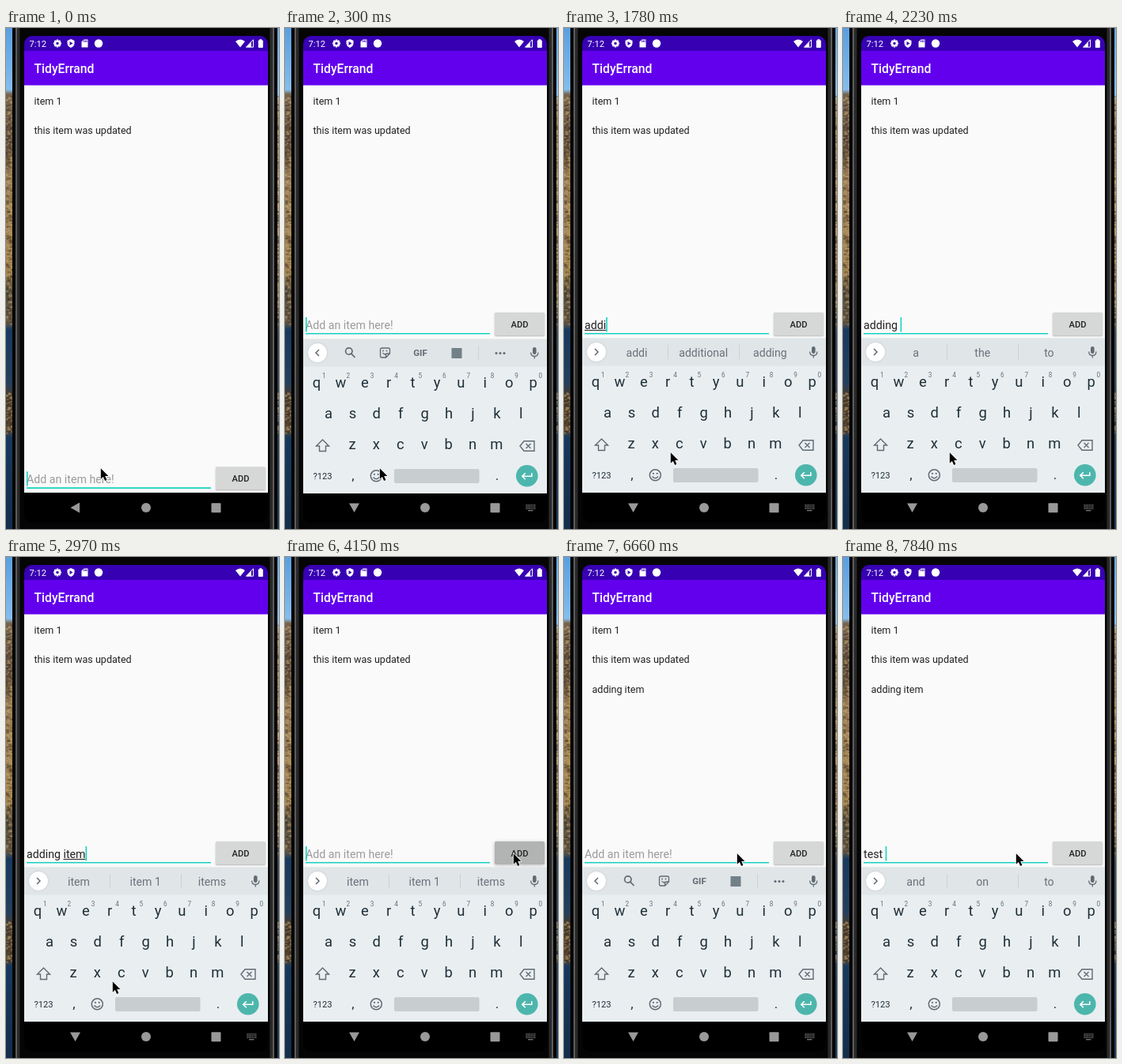
Animation, 345 px wide and 634 px high, one loop 8 s. Source, as an HTML page with a canvas:

```html
<!DOCTYPE html>
<html lang="en">
<head>
<meta charset="utf-8">
<title>To-do list</title>
<style>
html, body { margin: 0; width: 100%; height: 100%; overflow: hidden; background: #000; }
canvas { display: block; width: 345px; height: 634px; }
</style>
</head>
<body>
<canvas id="stage"></canvas>
<script>
const W = 345, H = 634, LOOP = 8000, TICK = LOOP / 54;
const canvas = document.getElementById('stage');
const dpr = window.devicePixelRatio || 1;
canvas.width = W * dpr;
canvas.height = H * dpr;
const c = canvas.getContext('2d');

const INK = '#1f3038', ICON = '#5f6b72', TEAL = '#14d3c1', KEYS = '#e9eef1';
const HINT = 'Add an item here!';
const TOOLBAR_BACK = 4440;

// time, typed text, suggestions (none: toolbar icons)
const typing = [
  [0, ''],
  [150, ''],
  [1040, 'a', 'a and at'],
  [1190, 'ad', 'ad add ads'],
  [1490, 'add', 'add added adding'],
  [1780, 'addi', 'addi additional adding'],
  [1930, 'addin', 'addin adding addings'],
  [2080, 'adding', 'adding adding. additional'],
  [2230, 'adding ', 'a the to'],
  [2380, 'adding i', 'I in it'],
  [2680, 'adding it', 'it its item'],
  [2820, 'adding ite', 'ite item items'],
  [2970, 'adding item', 'item item_1 items'],
  [4150, '', 'item item_1 items'],
  [7100, 't', 't the to'],
  [7400, 'te', 'te tell text'],
  [7550, 'tes', 'tes test tests'],
  [7700, 'test', 'test tests testing'],
  [7840, 'test ', 'and on to']
];

// time, x, y of the pointer tip
const pointer = [
  [0, 119, 557], [440, 124, 551], [590, 131, 541], [740, 134, 537],
  [3410, 153, 521], [3560, 207, 465], [3700, 266, 396], [3850, 288, 375],
  [4580, 283, 376], [4730, 261, 378], [4880, 236, 376], [5020, 223, 375], [5170, 218, 375]
];
const slide = [[0, 196], [150, 70], [300, 1], [440, 0]];
const toastAlpha = [[0, 0], [4440, 0.45], [4580, 1], [6360, 0.7], [6510, 0.25], [6660, 0]];

const at = (list, t) => list.findLast(k => k[0] <= t);

function rect(x, y, w, h, fill, r = 0) {
  c.fillStyle = fill;
  c.beginPath();
  c.roundRect(x, y, w, h, r);
  c.fill();
}

function disc(x, y, r, fill) {
  c.fillStyle = fill;
  c.beginPath();
  c.arc(x, y, r, 0, Math.PI * 2);
  c.fill();
}

function text(s, x, y, size, fill, align = 'left', weight = 400) {
  c.font = `${weight} ${size}px Roboto, sans-serif`;
  c.textAlign = align;
  c.fillStyle = fill;
  c.fillText(s, x, y);
}

// SVG path placed at x, y
function shape(d, x, y, fill, line, width = 1.5) {
  const p = new Path2D(d);
  c.save();
  c.translate(x, y);
  if (fill) { c.fillStyle = fill; c.fill(p); }
  if (line) { c.strokeStyle = line; c.lineWidth = width; c.stroke(p); }
  c.restore();
}

function fade(x, w, stops) {
  const g = c.createLinearGradient(0, 0, 0, H);
  stops.forEach(([y, color]) => g.addColorStop(y / H, color));
  rect(x, 0, w, H, g);
}

// rocky speckle between two heights
function grain(x, w, top, bottom) {
  let seed = 7;
  const rnd = () => (seed = seed * 16807 % 2147483647) / 2147483647;
  for (let y = top; y < bottom; y += 1.2) {
    const tone = rnd() < 0.55 ? '40,30,20' : '215,180,125';
    rect(x + rnd() * w - 2, y, 2 + rnd() * 3, 1 + rnd() * 2, `rgba(${tone},.35)`);
  }
}

function drawPhone() {
  fade(0, 9, [[0, '#5a9fe0'], [78, '#86bdec'], [84, '#75634c'], [150, '#5a4937'], [185, '#93774f'],
    [310, '#a2834f'], [335, '#4f4838'], [372, '#6a5b45'], [382, '#173a60'], [450, '#24405c'],
    [465, '#493c2c'], [510, '#574732'], [518, '#17395e'], [634, '#132d4c']]);
  fade(342, 3, [[0, '#6aa9e4'], [84, '#8cbfea'], [94, '#8c7a5f'], [330, '#a48b60'],
    [385, '#3d4c58'], [634, '#1b3a5c']]);
  for (const [x, w] of [[0, 9], [342, 3]]) {
    grain(x, w, 86, 376);
    grain(x, w, 460, 512);
  }
  rect(8, 0, 335, H, '#050505');
  for (const [x, w, color] of [[12, 2, '#5c5c5c'], [14, 3.5, '#2a2a2a']]) {
    rect(x, 0, w, H, color);
    rect(351 - x - w, 0, w, H, color);
  }
}

function drawBars() {
  rect(23, 10, 308, 20, '#3700b3', [10, 10, 0, 0]);
  rect(23, 29, 308, 43.4, '#6200ee');
  text('TidyErrand', 35.5, 57, 15.7, '#fff', 'left', 500);
  text('7:12', 29.5, 24, 11.2, '#fff');
  for (let i = 0; i < 4; i++) {
    c.save();
    c.translate(65, 19.5);
    c.rotate(i * Math.PI / 4);
    rect(-1.3, -5, 2.6, 10, '#fff', 0.5);
    c.restore();
  }
  disc(65, 19.5, 3.8, '#fff');
  disc(65, 19.5, 1.7, '#3700b3');
  shape('M0-5.5L4.5-3.5V0Q4 4 0 5.5Q-4 4-4.5 0V-3.5Z', 82, 19.5, '#fff');
  shape('M-1.5-2.5L2.5 0L-1.5 2.5Z', 82, 19.5, '#3700b3');
  shape('M-1-5H4V5H-4V-2Z', 99.5, 19.5, '#fff');
  for (let i = 0; i < 3; i++) rect(98.2 + i * 1.7, 15.5, 0.9, 2.4, '#3700b3');
  disc(117, 19.5, 5.2, '#fff');
  shape('M0 5L-6-2.5Q0-7.5 6-2.5Z', 296, 19.5, '#fff');
  shape('M-4.5 4.7H4.5V-4.7Z', 308, 19.5, null, '#fff', 1);
  shape('M-4.5 4.7H2V-2Z', 308, 19.5, '#fff');
  rect(318.8, 15.5, 6, 9.5, '#fff', 0.8);
  rect(320.4, 14.2, 2.8, 2, '#fff');
}

function drawInput(t, typed, since, dy, pressed) {
  const x = 26, base = 380.5 + dy;
  text(typed || HINT, x, base, 14.2, typed ? '#212121' : '#9b9b9b');
  const word = typed.lastIndexOf(' ') + 1;
  if (word < typed.length) {
    const from = c.measureText(typed.slice(0, word)).width;
    rect(x + from, base + 1.5, c.measureText(typed.slice(word)).width, 1, '#212121');
  }
  rect(x, 386 + dy, 233, 1.6, TEAL);
  const tick = Math.floor((t + 12) / TICK) * TICK;
  if ((tick - since + 30) % 1000 < 500) {
    const w = typed ? c.measureText(typed).width : 0;
    rect(x + w, 366 + dy, 1.6, 18.5, TEAL);
  }
  c.save();
  c.shadowColor = 'rgba(0,0,0,.28)';
  c.shadowBlur = pressed ? 4 : 2;
  c.shadowOffsetY = 1;
  rect(265, 360 + dy, 63, 29, pressed ? '#b2b3b3' : '#d6d7d7', 1.6);
  c.restore();
  text('ADD', 296.5, 378.7 + dy, 11.2, '#222', 'center', 500);
}

function drawStrip(words) {
  rect(23, 392.5, 308, 35, '#e0e5e8');
  c.save();
  c.shadowColor = 'rgba(0,0,0,.2)';
  c.shadowBlur = 2;
  disc(41, 410, 12, '#fff');
  c.restore();
  shape(words ? 'M-2-4L2 0L-2 4' : 'M2-4L-2 0L2 4', 41, 410, null, ICON);
  if (words) {
    words.split(' ').forEach((w, i) =>
      text(w.replace('_', ' '), 92 + i * 84.2, 415.5, 14.1, '#68737a', 'center'));
    rect(131, 401, 1, 18, '#ccd2d5');
    rect(221, 401, 1, 18, '#ccd2d5');
  } else {
    shape('M3-2A4.2 4.2 0 1 1-5.4-2A4.2 4.2 0 1 1 3-2M2 1.4L6.5 6', 82, 410, null, ICON, 1.7);
    shape('M-4-6H4Q6-6 6-4V1L1 6H-4Q-6 6-6 4V-4Q-6-6-4-6M6 1H3Q1 1 1 3V6M-3 0Q-1 3 1 1', 126.5, 410, null, ICON, 1.3);
    disc(124, 407.5, 0.9, ICON);
    disc(128.5, 407.5, 0.9, ICON);
    text('GIF', 171, 414.2, 11.5, ICON, 'center', 700);
    rect(210.5, 404, 13, 13, '#728087');
    rect(244, 401, 1, 18, '#ccd2d5');
    for (let i = -1; i < 2; i++) disc(272 + i * 5, 410.5, 1.5, ICON);
  }
  rect(313, 403, 4.6, 9, ICON, 2.3);
  shape('M-4.6-1Q-4.6 4 0 4Q4.6 4 4.6-1M0 4V7', 315.3, 410.5, null, ICON, 1.3);
}

function drawKeys() {
  const rows = ['qwertyuiop', 'asdfghjkl', 'zxcvbnm'];
  rows.forEach((row, r) => {
    const x0 = [40, 55, 85][r];
    [...row].forEach((k, i) => {
      const x = x0 + i * 30.4;
      text(k, x, 453.7 + r * 39.2, 18.4, INK, 'center');
      if (!r) text((i + 1) % 10, x + 9.3, 441.8, 8.2, '#66727a', 'center');
    });
  });
  shape('M0-7.5L8 .5H4V7H-4V.5H-8Z', 47.5, 527.5, null, ICON, 1.4);
  shape('M-9 0L-4-6.3H9V6.3H-4ZM-1.5-3L4.5 3M4.5-3L-1.5 3', 306, 528, null, ICON, 1.4);
  text('?123', 47.5, 570, 11.2, INK, 'center');
  text(',', 86, 570.5, 17, INK, 'center');
  text('.', 268, 570.5, 17, INK, 'center');
  shape('M7 0A7 7 0 1 1-7 0A7 7 0 1 1 7 0M-3.8 1.8Q0 6.2 3.8 1.8', 115.3, 565.8, null, ICON, 1.5);
  disc(112.9, 563.8, 1.1, ICON);
  disc(117.7, 563.8, 1.1, ICON);
  rect(138, 557, 107.5, 18, '#c8cdd0', 2);
  disc(305.8, 565.8, 13.8, '#4db6ac');
  shape('M6-4V0H-6M-2-4L-6 0L-2 4', 305.8, 566.3, null, '#fff', 1.6);
}

function drawToast(alpha) {
  if (!alpha) return;
  c.save();
  c.globalAlpha = alpha;
  c.shadowColor = 'rgba(0,0,0,.12)';
  c.shadowBlur = 3;
  rect(119, 533.5, 116, 35.5, '#ebeff1', 17.7);
  c.shadowColor = 'transparent';
  text('Item was added', 176.8, 555, 11.1, '#202020', 'center');
  c.restore();
}

function drawNav(open) {
  const gray = '#999';
  rect(23, 588, 308, 38, '#000', [0, 0, 10, 10]);
  shape(open ? 'M-6.5-5.5H6.5L0 6Z' : 'M5.5-6.5V6.5L-6 0Z', 87.5, 607, gray);
  disc(177, 607, 6, gray);
  rect(259.5, 601.3, 12, 12, gray, 1);
  if (!open) return;
  for (let r = 0; r < 3; r++)
    for (let i = 0; i < 6; i++) rect(304.5 + i * 2.1, 603 + r * 2.3, 1.3, 1.4, '#777');
  rect(307, 610, 6.5, 1.3, '#777');
}

function drawPointer(x, y) {
  c.lineJoin = 'round';
  const d = 'M0 0V13.4L3.1 10.6L5.3 15.6L7.6 14.6L5.4 9.7H9.6Z';
  shape(d, x + 0.8, y + 0.3, '#000', '#fff', 1.6);
  shape(d, x + 0.8, y + 0.3, '#000');
  c.lineJoin = 'miter';
}

function drawKeyboard(dy, words) {
  c.save();
  c.beginPath();
  c.rect(23, 392, 308, 197);
  c.clip();
  c.translate(0, dy);
  rect(23, 392.5, 308, 195.5, KEYS);
  drawStrip(words);
  drawKeys();
  c.restore();
}

function draw(t) {
  const [since, typed, words] = at(typing, t);
  const open = t >= 150;
  c.setTransform(dpr, 0, 0, dpr, 0, 0);
  c.clearRect(0, 0, W, H);
  drawPhone();
  rect(23, 72, 308, 516, '#fafafa');
  drawBars();
  const items = ['item 1', 'this item was updated'];
  if (t >= 4290) items.push('adding item');
  items.forEach((s, i) => text(s, 35.5, 96.5 + i * 37.7, 12.55, '#222'));
  drawInput(t, typed, since, open ? 0 : 195.3, t >= 4000 && t < 4290);
  drawNav(open);
  if (open) drawKeyboard(at(slide, t)[1], typed || t < TOOLBAR_BACK ? words : null);
  drawToast(at(toastAlpha, t)[1]);
  const [, x, y] = at(pointer, t);
  drawPointer(x, y);
}

const start = performance.now();
function loop() {
  draw((performance.now() - start) % LOOP);
  requestAnimationFrame(loop);
}
loop();
</script>
</body>
</html>
```
